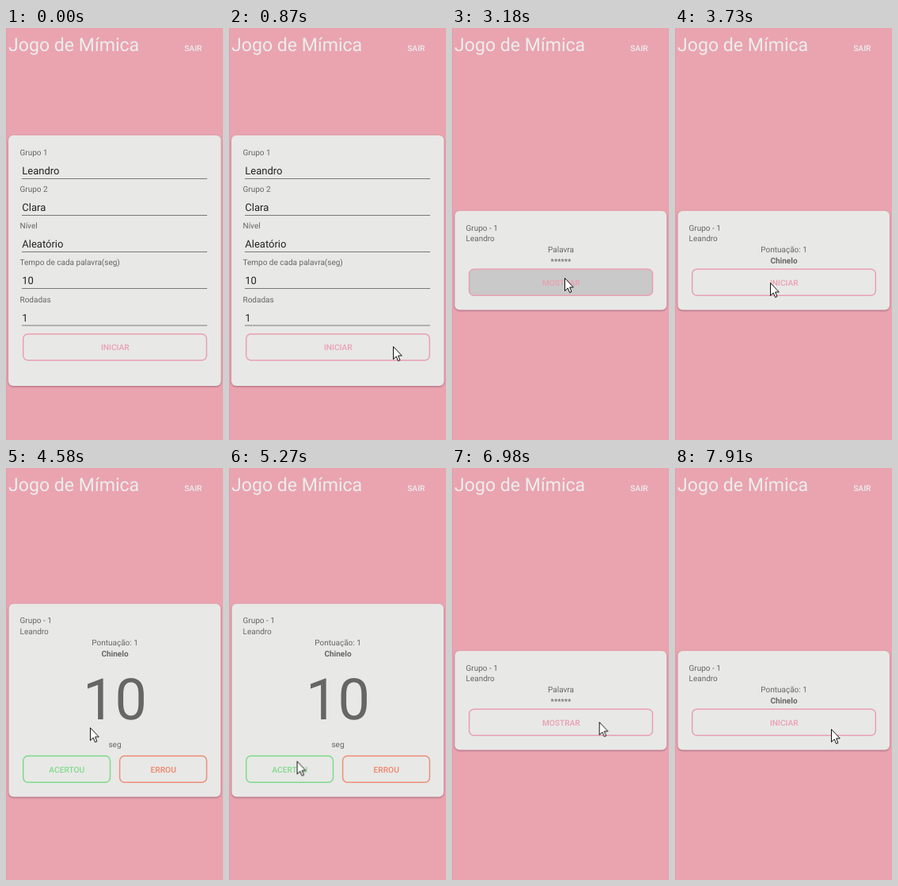
These frames come from a looping animation (274 px wide and 518 px high, 8 s). An HTML page:

```html
<!DOCTYPE html>
<html lang="pt">
<head>
<meta charset="utf-8">
<title>Jogo de Mímica</title>
<style>
html, body { margin: 0; width: 100%; height: 100%; overflow: hidden; background: #e9a4b0; }
svg { display: block; width: 274px; height: 518px; font: 10px Roboto, sans-serif; fill: #666; text-rendering: geometricPrecision; }
.title { font-size: 23.1px; fill: #ededed; }
.caps { font-size: 10.2px; font-weight: 500; text-anchor: middle; }
.mid { text-anchor: middle; }
.bold { font-weight: 700; }
.value { font-size: 13px; fill: #222; }
.digits { font-size: 72px; text-anchor: middle; }
.card { fill: #e8e8e7; filter: drop-shadow(0 1px 1px rgba(100, 40, 60, .5)); }
.button { fill: #e8e8e7; stroke-width: 1.5; }
.pink { stroke: #e9a0b1; }
.green { stroke: #80da88; }
.orange { stroke: #ee9076; }
.caps.pink { fill: #e9a0b1; stroke: none; }
.caps.green { fill: #80da88; stroke: none; }
.caps.orange { fill: #ee8468; stroke: none; }

/* One shared 8 s clock: 1% = 80 ms */
.form, .turn, .play, .player1, .player2, .secret, .word, .ten, .nine { animation: 8s step-end infinite; }
.form { animation-name: form; }
.turn { animation-name: turn; }
.play { animation-name: play; }
.player1 { animation-name: player1; }
.player2 { animation-name: player2; }
.secret { animation-name: secret; }
.word { animation-name: word; }
.ten { animation-name: ten; }
.nine { animation-name: nine; }
@keyframes form { 0% { opacity: 1 } 20%, 100% { opacity: 0 } }
@keyframes turn { 0% { opacity: 0 } 20% { opacity: 1 } 56.625% { opacity: 0 } 81.375%, 100% { opacity: 1 } }
@keyframes play { 0% { opacity: 0 } 56.625% { opacity: 1 } 81.375%, 100% { opacity: 0 } }
@keyframes player1 { 0% { opacity: 1 } 81.375%, 100% { opacity: 0 } }
@keyframes player2 { 0% { opacity: 0 } 81.375%, 100% { opacity: 1 } }
@keyframes secret { 0% { opacity: 1 } 40.75% { opacity: 0 } 81.375% { opacity: 1 } 95.5%, 100% { opacity: 0 } }
@keyframes word { 0% { opacity: 0 } 40.75% { opacity: 1 } 81.375% { opacity: 0 } 95.5%, 100% { opacity: 1 } }
@keyframes ten { 0% { opacity: 1 } 68.875%, 100% { opacity: 0 } }
@keyframes nine { 0% { opacity: 0 } 68.875%, 100% { opacity: 1 } }

.press-form { animation: press-form 8s step-end infinite; }
.press-turn { animation: press-turn 8s linear infinite; }
.press-hit { animation: press-hit 8s linear infinite; }
@keyframes press-form { 19.75% { fill: #c9c9c9 } 20% { fill: #e8e8e7 } }
@keyframes press-turn {
  0%, 39.74% { fill: #e8e8e7 }
  39.75%, 40.75% { fill: #c9c9c9 }
  43%, 56.37% { fill: #e8e8e7 }
  56.375%, 56.625% { fill: #c9c9c9 }
  56.63%, 94.74% { fill: #e8e8e7 }
  94.75%, 95.5% { fill: #c9c9c9 }
  97.5%, 100% { fill: #e8e8e7 }
}
@keyframes press-hit {
  0%, 74.125% { fill: #e8e8e7 }
  75.875%, 81.375% { fill: #c9c9c9 }
  81.38%, 100% { fill: #e8e8e7 }
}

.cursor { fill: #fff; stroke: #111; stroke-width: 1; animation: cursor 8s linear infinite; }
@keyframes cursor {
  0%, 1.625% { transform: translate(275px, 349px); animation-timing-function: ease-out }
  10.875%, 22.75% { transform: translate(207px, 400px) }
  25.875% { transform: translate(177px, 335px); animation-timing-function: ease-out }
  32.25%, 40.75% { transform: translate(142px, 314px); animation-timing-function: ease-in-out }
  46.625%, 56.375% { transform: translate(120px, 320px) }
  57.25% { transform: translate(106px, 326px); animation-timing-function: ease-out }
  62.25%, 64.5% { transform: translate(90px, 352px); animation-timing-function: ease-out }
  67%, 81.375% { transform: translate(84px, 374px); animation-timing-function: ease-out }
  84.5%, 87.25% { transform: translate(185.5px, 319px) }
  88%, 95.5% { transform: translate(190px, 320px); animation-timing-function: ease-out }
  98.875%, 100% { transform: translate(197px, 328px) }
}
</style>
</head>
<body>
<svg viewBox="0 0 274 518">
  <defs>
    <g id="player">
      <g class="player1"><text x="17.5" y="254.5">Grupo - 1</text><text x="17.5" y="268.3">Leandro</text></g>
      <g class="player2"><text x="17.5" y="254.5">Grupo - 2</text><text x="17.5" y="268.3">Clara</text></g>
    </g>
    <g id="score" class="mid">
      <text x="137.5" y="282">Pontuação: 1</text>
      <text class="bold" x="137.5" y="296">Chinelo</text>
    </g>
  </defs>

  <rect width="274" height="518" fill="#e9a4b0"/>
  <rect width="1" height="518" fill="#de9fb2"/>
  <text class="title" x="3" y="29">Jogo de Mímica</text>
  <text class="caps" x="236.3" y="29.3" style="fill:#ededed">SAIR</text>

  <g class="form">
    <rect class="card" x="3" y="135" width="268.5" height="315" rx="6"/>
    <text x="17.5" y="160">Grupo 1</text><text class="value" x="20.3" y="184">Leandro</text>
    <text x="17.5" y="206">Grupo 2</text><text class="value" x="20.3" y="230">Clara</text>
    <text x="17.5" y="252">Nível</text><text class="value" x="20.3" y="276">Aleatório</text>
    <text x="17.5" y="298.3">Tempo de cada palavra(seg)</text><text class="value" x="20.3" y="322.3">10</text>
    <text x="17.5" y="344.5">Rodadas</text><text class="value" x="20.3" y="368.5">1</text>
    <path d="M20 189.5h234M20 235.5h234M20 281.5h234M20 327.5h234M20 374h234" stroke="#6c6c6c" stroke-width=".9"/>
    <rect class="button pink press-form" x="21.7" y="384.7" width="231.6" height="33" rx="6"/>
    <text class="caps pink" x="137.8" y="405">INICIAR</text>
  </g>

  <g class="turn">
    <rect class="card" x="3.5" y="230" width="267.5" height="124.5" rx="6"/>
    <use href="#player"/>
    <rect class="button pink press-turn" x="21.7" y="303.2" width="231.6" height="33" rx="6"/>
    <g class="secret">
      <text class="mid" x="137.5" y="282">Palavra</text>
      <text class="mid" x="137.5" y="296.5">******</text>
      <text class="caps pink" x="137.8" y="323.6">MOSTRAR</text>
    </g>
    <g class="word">
      <use href="#score"/>
      <text class="caps pink" x="137.8" y="323.6">INICIAR</text>
    </g>
  </g>

  <g class="play">
    <rect class="card" x="3.5" y="170.7" width="267.5" height="242.8" rx="6"/>
    <g transform="translate(0 -59.4)"><use href="#player"/><use href="#score"/></g>
    <text class="digits ten" x="137.5" y="316">10</text>
    <text class="digits nine" x="137.5" y="316">9</text>
    <text class="mid" x="137.5" y="350.5">seg</text>
    <rect class="button green press-hit" x="21.7" y="361.9" width="109.8" height="33.4" rx="6"/>
    <text class="caps green" x="76.8" y="382.6">ACERTOU</text>
    <rect class="button orange" x="143.6" y="361.9" width="109.8" height="33.4" rx="6"/>
    <text class="caps orange" x="198.7" y="382.6">ERROU</text>
  </g>

  <path class="cursor" d="M.5.5V16.5L4.2 13L6.6 18.6L9 17.6L6.6 12H11.3Z"/>
</svg>
</body>
</html>
```
